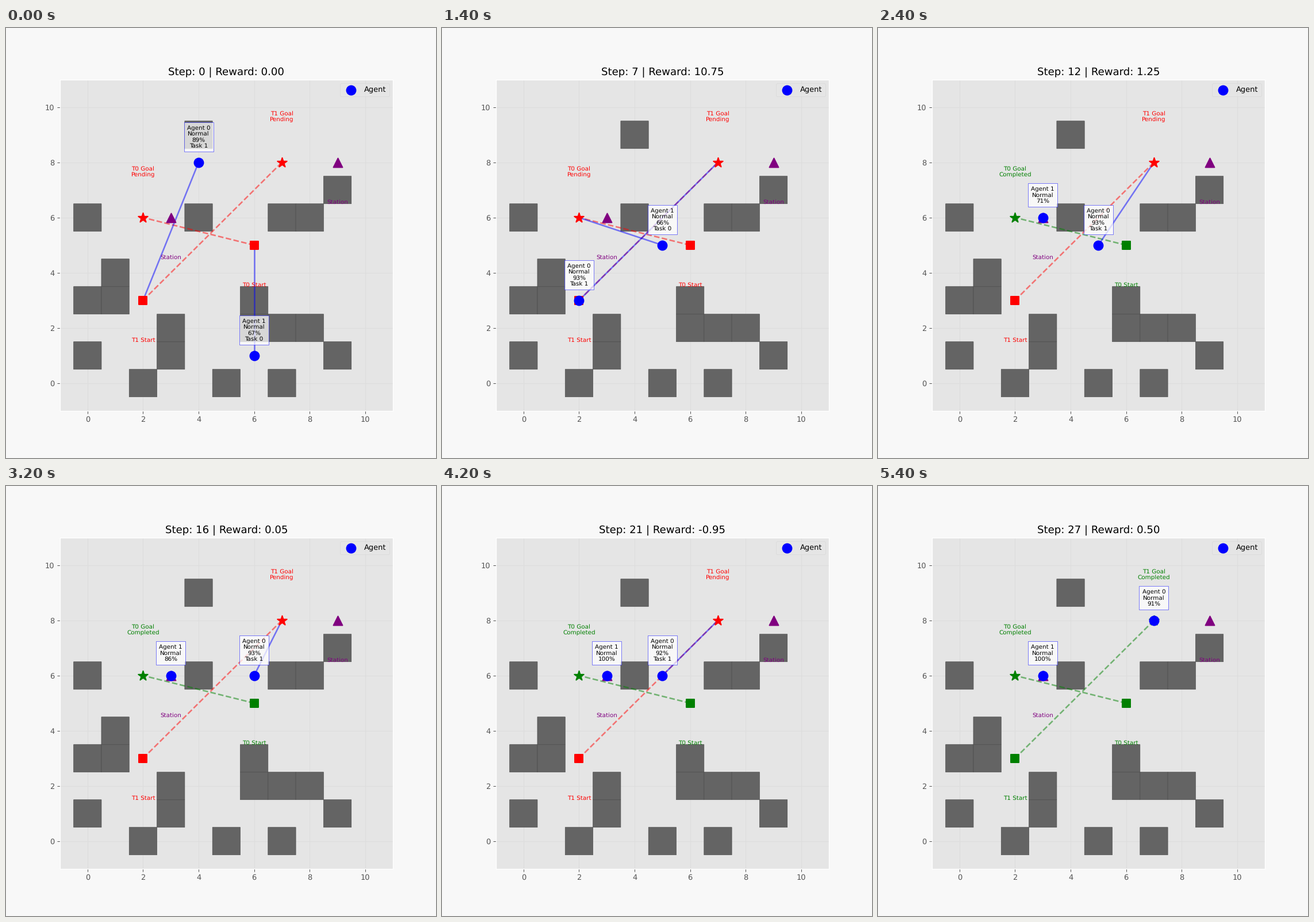
A matplotlib script for the animation above (5.6 s loop, 748x748 px).

```python
import numpy as np
import matplotlib.pyplot as plt
from matplotlib.animation import FuncAnimation
from matplotlib.patches import Rectangle

plt.rcParams.update({
    "font.family": "DejaVu Sans", "font.size": 10, "text.hinting": "none",
    "axes.edgecolor": "white", "axes.linewidth": 1, "axes.axisbelow": True,
    "xtick.color": "#555555", "ytick.color": "#555555", "patch.linewidth": 0.5,
})

STEPS = 28

# '#' obstacle, '^' station; the last row is y = 0
MAP = """
....#.....
.........^
.........#
#..^#..##.
..........
.#........
##....#...
...#..###.
#..#.....#
..#..#.#..
""".split()


def cells(mark):
    return [(x, y) for y, row in enumerate(reversed(MAP))
            for x, c in enumerate(row) if c == mark]


OBSTACLES, STATIONS = cells("#"), cells("^")


def advance(pos, goal):
    """One cell along the longer free axis towards the goal."""
    delta = np.subtract(goal, pos)
    order = (1, 0) if abs(delta[1]) >= abs(delta[0]) else (0, 1)
    for axis in order:
        nxt = list(pos)
        nxt[axis] += int(np.sign(delta[axis]))
        if delta[axis] and tuple(nxt) not in OBSTACLES:
            return tuple(nxt)
    return pos


def route(pos, stops):
    """Visit the stops in turn; a repeated stop waits one step."""
    path = [pos]
    for stop in stops:
        path.append(advance(path[-1], stop))
        while path[-1] != stop:
            path.append(advance(path[-1], stop))
    return path + path[-1:] * (STEPS - len(path))


def charge(steps, levels):
    return np.minimum(np.rint(np.interp(range(STEPS), steps, levels)), 100)


DOCK, SIDE = (3, 6), (2, 6)
PATHS = [route((4, 8), [(2, 3), (5, 6)] + [(6, 6), (5, 6)] * 4 + [(7, 8)]),
         route((6, 1), [(5, 3), (6, 5), (2, 5), SIDE, DOCK, SIDE]
               + [DOCK] * 10 + [(1, 6), DOCK])]
BATTERY = [charge([0, 2, 3, 16, 27], [89, 89, 93.6, 92.55, 91]),
           charge([0, 11, 12, 13, 19], [67, 66, 71, 71, 101])]
AGENT_TASK = [1, 0]
TASKS = [dict(start=(6, 5), goal=(2, 6)), dict(start=(2, 3), goal=(7, 8))]
for path, k in zip(PATHS, AGENT_TASK):
    t = TASKS[k]
    t["picked"] = path.index(t["start"])
    t["done"] = path.index(t["goal"], t["picked"])


def target(t, step):
    return t["goal"] if step >= t["picked"] else t["start"]


def reward(step):
    if step == 0:
        return 0
    total = 0
    for path, k in zip(PATHS, AGENT_TASK):
        t, pos = TASKS[k], path[step]
        busy = step <= t["done"]
        if step in (t["picked"], t["done"]):
            total += 5 * (k + 1)
        elif busy:
            aim = target(t, step)
            old, new = (np.abs(np.subtract(aim, p)).sum()
                        for p in (path[step - 1], pos))
            total += 0.75 if new < old else -0.25
            leg = t["picked"] if step > t["picked"] else 0
            total -= 1.2 * (pos in path[leg:step])
        if pos in STATIONS:
            total += 0.75 if busy else 0.5
    return total


fig, ax = plt.subplots(figsize=(8, 8), dpi=93.5, facecolor="#f8f8f8")
ax.set_facecolor("#e5e5e5")
ax.set(xlim=(-1, 11), ylim=(-1, 11))
ax.grid(True, color="#dddddd", linewidth=0.8)
title = ax.set_title("", fontsize=14, pad=5.2)


def mark(pos, marker, size, color, z, **kw):
    return ax.scatter(*pos, marker=marker, s=size, c=color,
                      linewidths=1.5, zorder=z, **kw)


def note(x, y, text="", color="black", z=6, **kw):
    return ax.text(x, y, text, color=color, fontsize=8, ha="center",
                   linespacing=1.07, zorder=z, **kw)


def link(a, b, color, style="-"):
    return ax.plot([a[0], b[0]], [a[1], b[1]], style, color=color,
                   lw=2, alpha=0.5, zorder=2)[0]


for x, y in OBSTACLES:
    ax.add_patch(Rectangle((x - 0.5, y - 0.5), 1, 1, facecolor="#646464",
                           edgecolor="#4a4a4a", zorder=1, snap=False))
for x, y in STATIONS:
    mark((x, y), "^", 150, "purple", 3)
    note(x, y - 1.5, "Station", "purple")

task_art = []
for i, t in enumerate(TASKS):
    (sx, sy), (gx, gy) = t["start"], t["goal"]
    task_art.append(dict(
        path=link(t["start"], t["goal"], "red", "--"),
        start=mark(t["start"], "s", 120, "red", 3),
        goal=mark(t["goal"], "*", 180, "red", 3),
        start_note=note(sx, sy - 1.5, f"T{i} Start"),
        goal_note=note(gx, gy + 1.5)))

agent_art = []
for i, path in enumerate(PATHS):
    agent_art.append(dict(
        aim=link(path[0], path[0], "blue"),
        dot=mark(path[0], "o", 150, "blue", 4, label=None if i else "Agent"),
        info=note(*path[0], z=7, va="bottom",
                  bbox=dict(facecolor="white", edgecolor="blue", alpha=0.75))))

ax.legend(loc="upper right", facecolor="#e5e5e5", edgecolor="#d4d4d4")


def update(step):
    title.set_text(f"Step: {step} | Reward: {reward(step):.2f}")

    for i, (t, art) in enumerate(zip(TASKS, task_art)):
        done = step >= t["done"]
        for part in art.values():
            part.set_color("green" if done else "red")
        art["goal_note"].set_text(
            f"T{i} Goal\n" + ("Completed" if done else "Pending"))

    for i, art in enumerate(agent_art):
        x, y = PATHS[i][step]
        k = AGENT_TASK[i]
        active = step < TASKS[k]["done"]
        tx, ty = target(TASKS[k], step)
        art["aim"].set_data([x, tx], [y, ty])
        art["aim"].set_visible(active)
        art["dot"].set_offsets([(x, y)])
        art["info"].set_position((x, y + 0.5))
        lines = [f"Agent {i}", "Normal", f"{BATTERY[i][step]:.0f}%"]
        art["info"].set_text("\n".join(lines + [f"Task {k}"] * active))
    return []


anim = FuncAnimation(fig, update, frames=STEPS, init_func=lambda: update(0),
                     interval=200, repeat=True, repeat_delay=0, blit=False)
plt.show()
```
